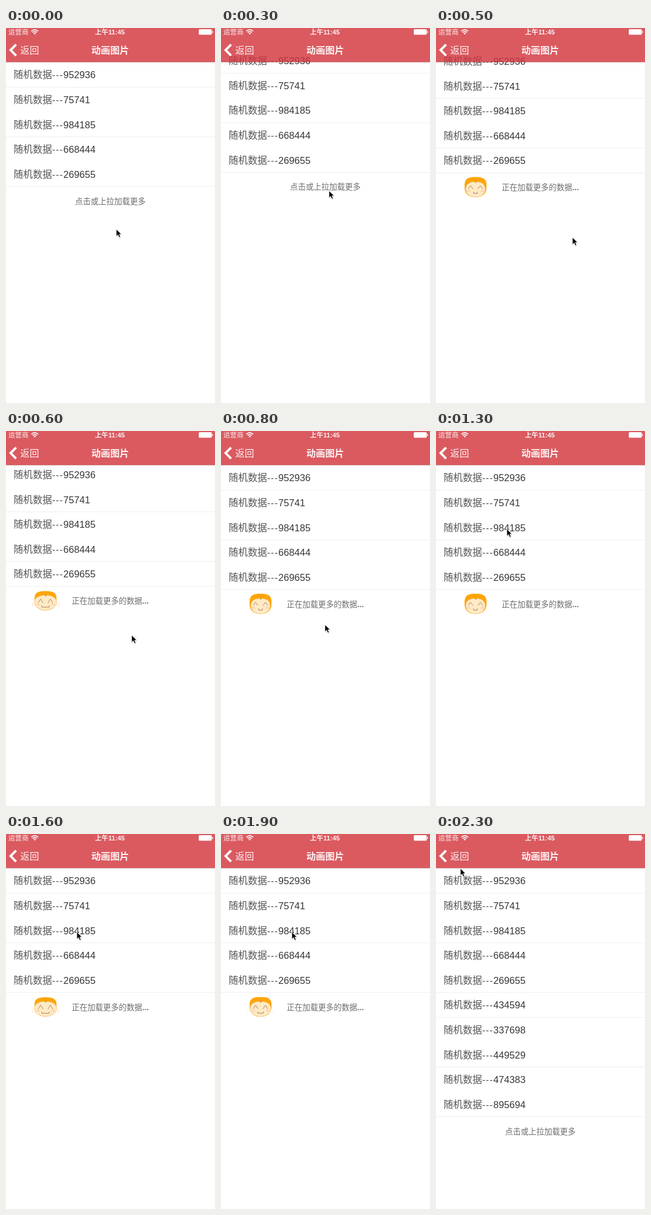
Write an HTML page that moves like this. It is 360 px wide and 643 px high and loops after 2.4 s.

```html
<!DOCTYPE html>
<html lang="zh">
<head>
<meta charset="utf-8">
<title>动画图片</title>
<style>
  html, body { margin: 0; width: 100%; height: 100%; overflow: hidden; background: #fff; }
  svg { display: block; width: 100%; height: 100%; }
  text { font-family: "Liberation Sans", "Noto Sans CJK SC", "Noto Sans CJK", sans-serif; }
  .row { font-size: 16.6px; font-weight: 300; fill: #555; }
  .dash { letter-spacing: .056em; }
  .num { fill: #363636; }
  .foot { font-size: 13.5px; fill: #6c6c6c; text-anchor: middle; }
  .dots { font-weight: 700; }
  .line { fill: #efeff0; }
  .bar text { fill: #fff; fill-opacity: .92; }
  .mid { text-anchor: middle; font-weight: 700; }
  .ink { fill: none; stroke: #a8744c; stroke-width: .9; stroke-linecap: round; stroke-linejoin: round; }
  .puff { fill: none; stroke: #fbd9b4; stroke-width: 1; stroke-linecap: round; }
</style>
</head>
<body>
<svg viewBox="0 0 360 643" preserveAspectRatio="none">
  <g id="list">
    <g id="rows"></g>
    <g id="footer">
      <text id="idle" class="foot" x="179.7" y="301.5">点击或上拉加载更多</text>
      <g id="loading">
        <text class="foot" x="179.7" y="301.5">正在加载更多的数据<tspan class="dots">...</tspan></text>
        <g id="faces"></g>
      </g>
    </g>
  </g>

  <g class="bar">
    <rect width="360" height="58.5" fill="rgb(210,54,61)" fill-opacity=".82"/>
    <rect y="58.5" width="360" height=".5" fill-opacity=".3"/>
    <text x="4" y="11.3" font-size="11.6" font-weight="300">运营商</text>
    <g fill="none" stroke="#fff" stroke-width="1.7">
      <path d="M43.6 5.4Q49.5 .2 55.4 5.4M45.7 7.7Q49.5 4.4 53.3 7.7"/>
      <path d="M47.4 9L49.5 11.2L51.6 9Q49.5 7.4 47.4 9Z" fill="#fff" stroke="none"/>
    </g>
    <text class="mid" x="179" y="11.2" font-size="11.4">上午11:45</text>
    <rect x="332" y="2" width="22.4" height="9.6" rx="1.6" fill="#fff"/>
    <rect x="355" y="5" width="1.4" height="3.6" rx=".7" fill="#fff"/>
    <path d="M17.4 28.3L8 37.8L17.4 47.3" fill="none" stroke="#fff" stroke-width="4"/>
    <text x="24.6" y="43.8" font-size="16.2">返回</text>
    <text class="mid" x="179.6" y="43.9" font-size="16.3">动画图片</text>
  </g>

  <g id="cursor">
    <path d="M.6 1.8V14L3.6 11.4L5.6 16L7.8 15L5.9 10.6H9.6Z" opacity=".16"/>
    <path d="M0 0V12.2L2.9 9.6L5 14.2L7.2 13.2L5.2 8.8H9Z" stroke="#fff" stroke-width=".8"/>
  </g>
</svg>

<script>
const $ = id => document.getElementById(id);
const LOOP = 2400, STEP = 100;
const HEIGHT = 643, TOP = 58.55, ROW = 42.6;
const RELEASE = 400, LOAD = 500, DONE = 2000, REST = 800;
const numbers = [952936, 75741, 984185, 668444, 269655, 434594, 337698, 449529, 474383, 895694];

// Pointer key points: time, x, y
const path = [
  [100, 190, 345], [300, 186, 279], [400, 200, 191], [500, 235, 359], [800, 179, 332],
  [1100, 179, 332], [1300, 122, 168], [2000, 122, 168], [2300, 42, 59]
];

const show = (el, on) => el.setAttribute("visibility", on ? "inherit" : "hidden");
const move = (el, x, y) => el.setAttribute("transform", `translate(${x} ${y})`);

function pointer(t) {
  const i = path.findIndex(p => p[0] >= t);
  if (i <= 0) return path[0].slice(1);
  const [a, b] = [path[i - 1], path[i]];
  const k = (t - a[0]) / (b[0] - a[0]);
  return [a[1] + (b[1] - a[1]) * k, a[2] + (b[2] - a[2]) * k];
}

// Rubber-band resistance for the finger's travel beyond a small slop
function rubber(t) {
  const pull = Math.max(0, path[0][2] - pointer(t)[1] - 20.4);
  return -HEIGHT * (1 - 1 / (1 + pull * .55 / HEIGHT));
}

// Follow the finger, then ease back to rest
function scrollAt(t) {
  if (t <= RELEASE) return rubber(t);
  const left = Math.max(0, (REST - t) / (REST - RELEASE));
  return rubber(RELEASE) * left ** 3.6;
}

$("rows").innerHTML = numbers.map((n, i) => `<g>
  <text class="row" x="13" y="${86.4 + ROW * i}">随机数据<tspan class="dash">---</tspan><tspan class="num">${n}</tspan></text>
  <rect class="line" width="360" height="1"/></g>`).join("");

// w runs from 0 (relaxed) to 1 (cheeks puffed out)
function face(w) {
  const half = 16.6 + 2.6 * w, low = 313.2 - .4 * w, top = 279 + w;
  const jaw = (17 - 3 * w) * .65, mouth = 3.2 + 3.2 * w, my = 305.8 + .4 * w;
  const side = 301 - 3 * w, brow = 293.8 - .4 * w;
  const eye = x => `M${x - 4} ${299 + w}L${x} ${brow}L${x + 4} ${299 + w}`;
  const cheek = x => `<ellipse cx="${x}" cy="303" rx="3.2" ry="1.8" fill="#ffd3b0"/>`;
  return `<g>
    <path d="M49.6 ${side}C48 ${top + 5} 51 ${top} 68 ${top}S88.4 ${top + 5} 86.6 ${side}
      Q84 ${low} 68 ${low}T49.6 ${side}Z" fill="#ffa509"/>
    <path d="M${68 - half} 300C${68 - half} 290 59 287 68 287S${68 + half} 290 ${68 + half} 300
      C${68 + half} 307 ${68 + jaw} ${low} 68 ${low}S${68 - half} 307 ${68 - half} 300Z"
      fill="#ffeac6" stroke="#f7bd68" stroke-width=".8"/>
    <path d="M64 287.5Q68 284.5 72 287.5L69.4 287.2L68.4 290L67.2 287.2Z" fill="#ffa509"/>
    ${cheek(56 - w)}${cheek(80 + w)}
    <path class="ink" d="M68.6 286V288.6${eye(59.5)}${eye(76.5)}
      M${68 - mouth} ${my - 1.2}V${my + 1.2}H${68 + mouth}V${my - 1.2}"/>
    <path class="puff" opacity="${w}" d="M45 301.5Q44.6 304.5 46.6 306M91 301.5Q91.4 304.5 89.4 306"/>
  </g>`;
}
$("faces").innerHTML = [0, .5, 1].map(face).join("");

const rows = [...$("rows").children], faces = [...$("faces").children];

function draw(time) {
  const t = Math.floor(time % LOOP / STEP) * STEP;
  const loading = t >= LOAD && t < DONE;
  const count = t < DONE ? 5 : 10;
  const y = scrollAt(t);

  move($("list"), 0, y);
  move($("footer"), 0, ROW * (count - 5));
  move($("cursor"), ...pointer(t));
  rows.forEach((row, i) => {
    // Hairlines sit on whole pixels; those landing between two fade out
    const at = TOP + ROW * (i + 1) + y, pixel = Math.floor(at);
    show(row, i < count);
    show(row.lastElementChild, i < count && at - pixel < .6);
    row.lastElementChild.setAttribute("y", pixel - y);
  });

  show($("idle"), !loading);
  show($("loading"), loading);
  // The face images advance 1.8 per step
  const pose = Math.floor(.75 + 1.8 * (t - LOAD) / STEP) % 3;
  faces.forEach((f, i) => show(f, i === pose));
}

const start = performance.now();
function tick() {
  draw(performance.now() - start);
  requestAnimationFrame(tick);
}
tick();
</script>
</body>
</html>
```
